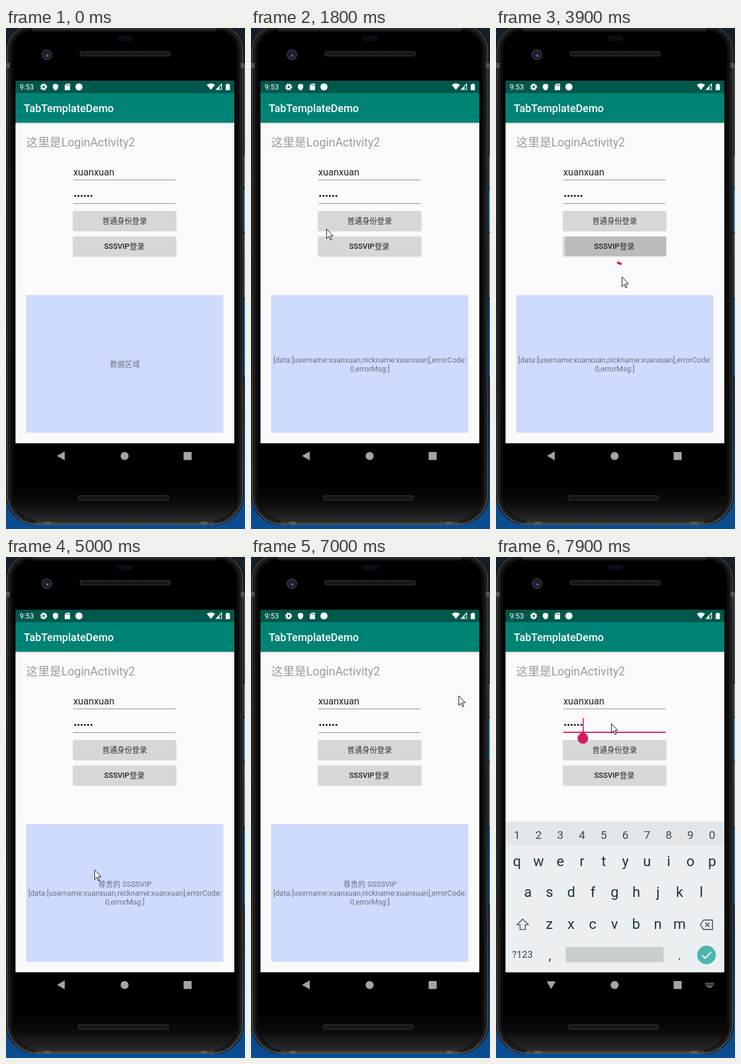
These frames come from a looping animation (403 by 846 pixels, 8000 ms). An HTML page with a canvas:

```html
<!DOCTYPE html>
<html lang="zh">
<head>
<meta charset="utf-8">
<title>Login screen</title>
<style>
html, body { margin: 0; width: 100%; height: 100%; overflow: hidden; background: #083a70; }
canvas { display: block; width: 403px; height: 846px; }
</style>
</head>
<body>
<canvas id="stage" width="403" height="846"></canvas>
<script>
const c = document.getElementById('stage').getContext('2d');
const LOOP = 8000, STEP = 100;
const FACE = 'Roboto, "Noto Sans CJK SC", "Noto Sans CJK", sans-serif';
const PINK = '#d81b60', NAV = '#a4a4a4';
const USER = 'xuanxuan';
const DATA = [`[data:[username:${USER},nickname:${USER}],errorCode:`, '0,errorMsg:]'];

// pointer path: time, x, y
const PATH = [
  [100, 335, 194], [300, 292, 250], [600, 209, 332], [700, 209, 332],
  [1000, 210, 327], [1200, 210, 326], [1400, 210, 326], [1600, 164, 290],
  [1800, 127, 339], [2000, 112, 500], [2200, 104, 628], [2300, 101, 618],
  [2700, 190, 500], [2900, 243, 425], [3100, 226, 391], [3300, 218, 375],
  [3700, 218, 375], [3900, 212, 420], [4200, 178, 520], [4500, 130, 582],
  [4700, 106, 568], [5000, 149, 528], [5200, 264, 582], [5400, 160, 568],
  [5800, 236, 570], [6000, 282, 552], [6100, 318, 440], [6300, 396, 155],
  [7000, 350, 234], [7300, 250, 262], [7500, 196, 283], [7700, 196, 283],
  [7800, 194, 281], [7900, 194, 281]
];

function rect(x, y, w, h, fill, r = 0) {
  c.fillStyle = fill;
  c.beginPath();
  c.roundRect(x, y, w, h, r);
  c.fill();
}
function frame(x, y, w, h, r, color, width) {
  c.strokeStyle = color;
  c.lineWidth = width;
  c.beginPath();
  c.roundRect(x, y, w, h, r);
  c.stroke();
}
function disc(x, y, r, fill) {
  c.fillStyle = fill;
  c.beginPath();
  c.arc(x, y, r, 0, 7);
  c.fill();
}
function trace(d, fill, stroke, width = 1) {
  const p = new Path2D(d);
  if (fill) { c.fillStyle = fill; c.fill(p); }
  if (stroke) { c.strokeStyle = stroke; c.lineWidth = width; c.stroke(p); }
}
function text(s, x, y, size, color, align = 'left', weight = 400) {
  c.font = `${weight} ${size}px ${FACE}`;
  c.textAlign = align;
  c.fillStyle = color;
  c.fillText(s, x, y);
}
function fade(x0, y0, x1, y1, ...colors) {
  const g = c.createLinearGradient(x0, y0, x1, y1);
  colors.forEach((k, i) => g.addColorStop(i / (colors.length - 1), k));
  return g;
}

function speaker(x, y) {
  rect(x, y, 154, 9, '#1c1a19', 4.5);
  frame(x + .5, y + .5, 153, 8, 4, '#34302d', 1);
  c.fillStyle = '#0d0c0b';
  for (let i = 5; i < 149; i += 3) c.fillRect(x + i, y + 3, 1, 3);
}

function phone() {
  rect(0, 0, 403, 846, fade(0, 0, 0, 846, '#14202c', '#123048', '#0a4d92'));
  rect(0, 62, 2, 170, '#68767b');
  rect(401, 62, 2, 150, '#3c4a55');
  rect(401, 214, 2, 56, '#707679');
  rect(401, 272, 2, 72, '#3799d2');
  rect(401, 346, 2, 110, '#77716e');
  rect(401, 458, 2, 130, '#1769b5');
  const body = [40, 40, 50, 50];
  rect(0, -5, 401, 844, '#0d0d0d', body);
  frame(2, -3.5, 397, 841, body, fade(0, 0, 0, 846, '#565656', '#383838', '#666'), 1.5);
  frame(5.5, 0, 390, 834, [37, 37, 46, 46], '#1f1f1f', 4);
  rect(12, 5, 377, 827, fade(0, 770, 0, 832, '#000', '#0b0b0b', '#292929'), [32, 32, 42, 42]);
  rect(45, 0, 310, 6, fade(0, 0, 0, 6, '#3a3a3a', '#111'));
  rect(50, 832, 301, 7, fade(0, 832, 0, 839, '#262626', '#555'));
  for (const x of [65, 329]) rect(x, 834, 11, 5, '#5c5c5c');
  for (const x of [0, 396]) rect(x, 59, 6, 8, '#50575a');
  rect(188, 13, 26, 9, '#0c0c18', 4);
  speaker(124, 39);
  speaker(121, 789);
  disc(69, 45, 9, '#333335');
  disc(69, 45, 6.5, '#141624');
  disc(69, 45.5, 3.5, '#252f66');
  disc(70, 47, 1.3, '#7f8cc4');
}

function statusBar() {
  rect(16, 89, 369, 21, '#00574b');
  text('9:53', 23, 104, 12.4, '#fff');
  c.save();
  c.setLineDash([2, 1.93]);
  c.strokeStyle = '#fff';
  c.lineWidth = 2;
  c.beginPath();
  c.arc(63.5, 99.5, 5, 0, 6.284);
  c.stroke();
  c.restore();
  c.strokeStyle = '#fff';
  c.lineWidth = 2.6;
  c.beginPath();
  c.arc(63.5, 99.5, 3.2, 0, 7);
  c.stroke();
  trace('M83.5 94L88 96V99.5Q88 103.5 83.5 105.5Q79 103.5 79 99.5V96Z', '#fff');
  trace('M102 94H108V105H99V97Z', '#fff');
  c.fillStyle = '#00574b';
  for (let i = 0; i < 3; i++) c.fillRect(102 + i * 2, 95.5, 1, 2.2);
  disc(123, 99.5, 6, '#fff');
  trace('M345.5 104.5L338.5 96Q345.5 91 352.5 96Z', '#fff');
  trace('M363.5 94.5V104H354.5Z', null, '#fff', 1.2);
  trace('M360 98V104H354.5Z', '#fff');
  trace('M370.5 95.2H372.5V94H375.5V95.2H377.5V105H370.5Z', '#fff');
}

function button(y, t, press, px) {
  c.save();
  c.shadowColor = 'rgba(0,0,0,.2)';
  c.shadowBlur = 2;
  c.shadowOffsetY = 1;
  rect(113, y, 174, 33, '#d6d7d7', 2);
  c.restore();
  const age = t - press;
  if (age < 0 || age >= 400) return;
  c.save();
  c.beginPath();
  c.roundRect(113, y, 174, 33, 2);
  c.clip();
  const a = .13 * Math.min(1, (400 - age) / 200);
  disc(px, y + 17, 20 + age * .41, `rgba(0,0,0,${a})`);
  c.restore();
}

function spinner(age) {
  if (age < 0 || age >= 200) return;
  const a = -Math.PI / 2 + .2 + age * .003;
  c.strokeStyle = PINK;
  c.lineWidth = 4;
  c.beginPath();
  c.arc(200, 416, 20.5, a, a + .4 + age * .007);
  c.stroke();
}

function dataArea(t) {
  rect(34, 451, 332.5, 232.5, '#cedbfc');
  const lines = t < 1800 ? ['数据区域'] : t < 4100 ? DATA : ['尊贵的 SSSSVIP', ...DATA];
  const top = [572, 565, 557][lines.length - 1];
  lines.forEach((s, i) => text(s, 200.4, top + i * 15, 12.57, '#6c7180', 'center'));
}

function fields(focus) {
  text(USER, 113.5, 249, 16.16, '#242424');
  rect(113.5, 256, 172.5, 1, '#8b8b8b');
  for (let i = 0; i < 6; i++) disc(116.7 + i * 5.45, 283.5, 1.7, '#202020');
  if (focus) rect(113.5, 295, 172.5, 2, PINK);
  else rect(113.5, 296, 172.5, 1, '#8b8b8b');
}

function keyboard(dy) {
  c.save();
  c.beginPath();
  c.rect(16, 440, 369, 261.5);
  c.clip();
  c.translate(0, dy);
  rect(16, 446, 369, 2, 'rgba(0,0,0,.05)');
  rect(16, 448, 369, 254, '#ebeff1');
  rect(16, 448, 369, 40, '#e2e6e9');
  const row = (keys, x, y, size, color) =>
    [...keys].forEach((k, i) => text(k, x + i * 36.57, y, size, color, 'center'));
  row('1234567890', 35.3, 475.5, 19, '#3c4a51');
  row('qwertyuiop', 35.3, 522, 24, '#20343b');
  row('asdfghjkl', 53.7, 574, 24, '#20343b');
  row('zxcvbnm', 90, 627.5, 24, '#20343b');
  trace('M45 611.5L54.5 621H49.5V629H40.5V621H35.5Z', null, '#55656c', 1.7);
  trace('M350 613H365V629H350L344.5 621ZM353 617.5L360 624.5M360 617.5L353 624.5', null, '#55656c', 1.8);
  text('?123', 44.5, 677, 16, '#56666d', 'center', 500);
  text(',', 91, 680, 22, '#20343b', 'center');
  text('.', 309.5, 680, 22, '#20343b', 'center');
  rect(117.5, 658.5, 165, 26, '#c8cdd0', 2);
  disc(355, 672, 15.7, '#4db6ac');
  trace('M347.5 672.5L352.5 677.5L363 667', null, '#fff', 2);
  c.restore();
}

function navBar(t) {
  rect(16, 701.5, 369, 43, '#000');
  const turn = t < 7700 ? 0 : t < 7800 ? -.2 : t < 7900 ? -1.35 : -Math.PI / 2;
  c.save();
  c.translate(93, 722.5);
  c.rotate(turn);
  trace('M-7 0L6 -7.5V7.5Z', NAV);
  c.restore();
  disc(200, 722.7, 6.8, NAV);
  rect(299.5, 716, 13.5, 13.5, NAV, 1);
  if (t < 7700) return;
  c.fillStyle = NAV;
  for (let r = 0; r < 2; r++)
    for (let i = 0; i < 6; i++) c.fillRect(353 + i * 2.5, 719 + r * 3, 1.6, 1.8);
  c.fillRect(356, 725, 8, 1.7);
}

function pointer(t) {
  if (t < 100 || (t >= 6400 && t < 7000)) return;
  let i = 0;
  while (i < PATH.length - 2 && PATH[i + 1][0] <= t) i++;
  const [t0, x0, y0] = PATH[i], [t1, x1, y1] = PATH[i + 1];
  const k = Math.min(1, (t - t0) / (t1 - t0));
  c.save();
  c.translate(Math.round(x0 + (x1 - x0) * k) + .5, Math.round(y0 + (y1 - y0) * k) + .5);
  trace('M0 0V16L3.7 12.5L6.3 18.3L8.5 17.3L6 11.5H11Z', '#fff', '#111', 1);
  c.restore();
}

function draw(t) {
  const focus = t >= 7600;
  phone();
  rect(16, 160, 369, 541.5, '#fafafa');
  statusBar();
  rect(16, 110, 369, 50, '#008374');
  rect(16, 160, 369, 4, fade(0, 160, 0, 164, 'rgba(0,0,0,.13)', 'rgba(0,0,0,0)'));
  text('TabTemplateDemo', 30, 142, 17.96, '#fff', 'left', 500);
  text('这里是LoginActivity2', 34, 200, 19.76, '#9c9c9c');
  fields(focus);
  button(309, t, 1400, 210);
  button(352, t, 3700, 218);
  text('普通身份登录', 200, 330, 12.57, '#333', 'center');
  text('SSSVIP', 208, 373, 12.57, '#222', 'right', 500);
  text('登录', 208.5, 373, 12.57, '#2a2a2a');
  spinner(t - 1600);
  spinner(t - 3900);
  dataArea(t);
  if (focus) {
    rect(146.3, 272, 1.7, 23, PINK);
    trace('M146.5 294.5L153 300A9 9 0 1 1 140 300Z', PINK);
  }
  if (t >= 7800) keyboard(t < 7900 ? 60 : 0);
  navBar(t);
  pointer(t);
}

const start = performance.now();
function tick() {
  const t = (performance.now() - start) % LOOP;
  draw(Math.floor(t / STEP) * STEP);
  requestAnimationFrame(tick);
}
tick();
</script>
</body>
</html>
```
